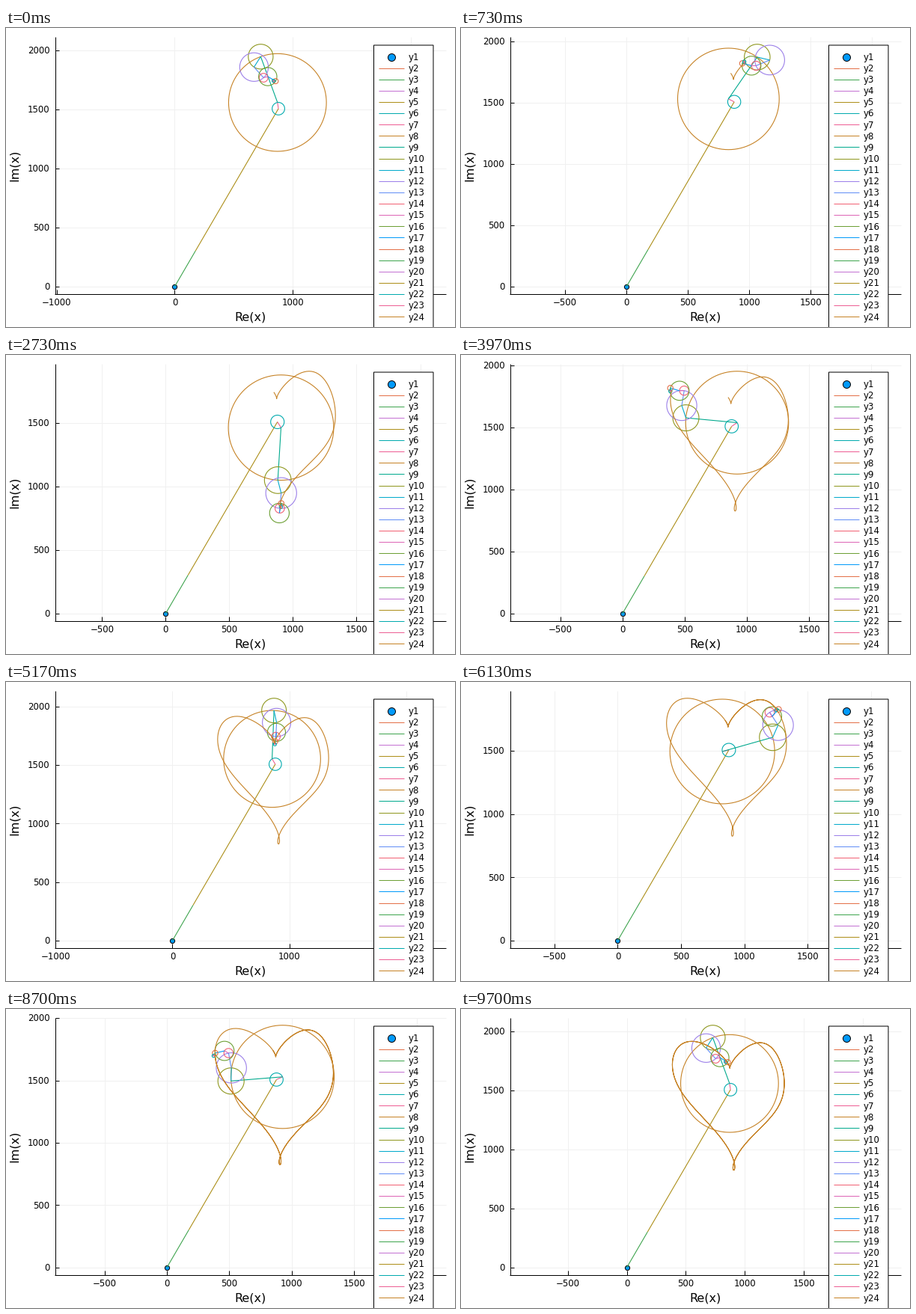
Write a matplotlib script that moves like this. It is 600 px wide and 400 px high and loops after 9730 ms.

```python
import numpy as np
import matplotlib.pyplot as plt
from matplotlib.animation import FuncAnimation
from matplotlib.collections import LineCollection
from matplotlib.patches import Rectangle

W, H, DPI = 600, 400, 100
PX = 72 / DPI                      # points per pixel
LOOP_MS, POSES = 9730, 292         # poses follow each other at 30 per second
LAP = POSES // 2                   # poses per lap, both ends included
FRAMES = 2 * POSES                 # half steps, to keep the 30/40 ms rhythm
INTERVAL = LOOP_MS / FRAMES

LEFT, RIGHT, TOP, BOTTOM = 65.6, 588, 12, 355.5
PAD = 0.03

PALETTE = ["#009afa", "#e36f47", "#3ea44e", "#c371d2", "#ac8e18", "#00aaae",
           "#ed5e93", "#c68225", "#00a98d", "#8e971e", "#00a9cc", "#9b7fe9",
           "#618df6", "#f06073", "#dd65b6", "#6c9f33"]

# Fourier terms: frequency, radius, starting angle in degrees
CENTRE = 878 + 1507j
TERMS = [(1, 53, 98.5), (-1, 414, 110.1), (2, 105, 237.5), (-2, 121, -48.2),
         (3, 37, 15), (-3, 77, -30), (4, 22, 172), (-4, 4, 350), (5, 13, -9)]
FREQ, RADIUS, ANGLE = np.array(TERMS, float).T
UNIT = np.exp(1j * np.linspace(0, 2 * np.pi, 101))

X_TICKS = range(-1000, 2001, 500)
Y_TICKS = range(0, 2001, 500)


def color(series):
    return PALETTE[(series - 1) % len(PALETTE)]


def joints(step):
    """Chain of arm ends, from the fixed centre to the tip."""
    turn = 2 * np.pi * (step % LAP) / (LAP - 1)
    arms = RADIUS * np.exp(1j * (np.radians(ANGLE) + FREQ * turn))
    return CENTRE + np.concatenate([[0], np.cumsum(arms)])


CHAINS = np.array([joints(k) for k in range(POSES)])
TIPS = CHAINS[:, -1]

plt.rcParams["font.family"] = "DejaVu Sans"
fig = plt.figure(figsize=(W / DPI, H / DPI), dpi=DPI, facecolor="white")
ax = fig.add_axes([0, 0, 1, 1])
ax.set_xlim(0, W)
ax.set_ylim(H, 0)
ax.axis("off")


def line(xs, ys, c="black", width=1.0, z=4):
    return ax.plot(xs, ys, color=c, lw=width * PX, zorder=z,
                   solid_capstyle="butt")[0]


def lines(segments, colors, width=1.0, z=2):
    group = LineCollection(segments, colors=colors, linewidths=width * PX,
                           zorder=z)
    return ax.add_collection(group, autolim=False)


def label(x, y, text, size=11.7, z=4, **kw):
    return ax.text(x, y, text, fontsize=size * PX, zorder=z, **kw)


def dot(x, y, size, z):
    return ax.plot([x], [y], "o", ms=size * PX, mfc=color(1), mec="black",
                   mew=PX, zorder=z)[0]


def tick_text(value):
    return str(value).replace("-", "\u2212")


def make_ticks(values, align):
    return [(v, line([], [], "#f0f0f0", z=0), line([], []),
             label(0, 0, tick_text(v), ha=align)) for v in values]


def draw_legend():
    ax.add_patch(Rectangle((491.5, 23), 79.5, 400, fc="white", ec="black",
                           lw=PX, zorder=6, snap=False))
    rows = [38.5 + 15.12 * i for i in range(24)]
    dot(515, rows[0], 10, 7)
    lines([[(497.5, y), (532, y)] for y in rows[1:]],
          [color(n) for n in range(2, 25)], z=7)
    for n, y in enumerate(rows, 1):
        label(538, y + 4.3, f"y{n}", z=7)


line([LEFT, LEFT], [TOP, BOTTOM + 0.5])
line([LEFT - 0.5, RIGHT], [BOTTOM, BOTTOM])
label((LEFT + RIGHT) / 2, 392, "Re(x)", 16, ha="center")
label(11, 183.5, "Im(x)", 16, rotation=90, ha="center", va="center")
draw_legend()

x_ticks = make_ticks(X_TICKS, "center")
y_ticks = make_ticks(Y_TICKS, "right")
origin = dot(0, 0, 6.2, 1)
arms = lines([], [color(3), color(5)]
             + [color(6 + i) for i in range(2 * len(TERMS))], 1.1)
trail = line([], [], color(24), 1.1, z=3)


def place_tick(parts, visible, grid, mark, text_pos):
    _, grid_line, mark_line, text = parts
    for artist in parts[1:]:
        artist.set_visible(visible)
    if visible:
        grid_line.set_data(*grid)
        mark_line.set_data(*mark)
        text.set_position(text_pos)


def pose_at(frame):
    """Latest pose due by the end of the frame, on a clock of 10 ms ticks."""
    ticks = int((frame + 1) * INTERVAL / 10)
    return min(int(0.3 * (ticks + 0.5)), POSES - 1)


def update(frame):
    k = pose_at(frame)
    chain, path = CHAINS[k], TIPS[:k + 1]
    tails = chain[:-1]

    # Height sets the scale; x is centred on the data at equal aspect.
    y_max = max((tails.imag + RADIUS).max(), path.imag.max())
    x_max = max((tails.real + RADIUS).max(), path.real.max())
    scale = (BOTTOM - TOP) / ((1 + 2 * PAD) * y_max)
    x0 = (LEFT + RIGHT) / 2 - scale * x_max / 2
    y0 = BOTTOM - scale * PAD * y_max

    def to_px(z):
        z = np.asarray(z)
        return np.column_stack([x0 + scale * z.real, y0 - scale * z.imag])

    segments = [to_px([0, 0.2 * CENTRE]), to_px([0.2 * CENTRE, CENTRE])]
    for tail, head, r in zip(tails, chain[1:], RADIUS):
        segments += [to_px(tail + r * UNIT), to_px([tail, head])]
    arms.set_segments(segments)
    trail.set_data(*to_px(path).T)
    origin.set_data([x0], [y0])

    coarse = x0 - 1000 * scale >= LEFT
    for parts in x_ticks:
        v = parts[0]
        x = x0 + scale * v
        shown = LEFT <= x <= RIGHT and not (coarse and v % 1000)
        place_tick(parts, shown, ([x, x], [TOP, BOTTOM]),
                   ([x, x], [BOTTOM - 5.5, BOTTOM]), (x, 371))
    for parts in y_ticks:
        y = y0 - scale * parts[0]
        place_tick(parts, y >= TOP, ([LEFT, RIGHT], [y, y]),
                   ([LEFT, LEFT + 5.5], [y, y]), (58.3, y + 4.3))
    return []


anim = FuncAnimation(fig, update, frames=FRAMES, interval=INTERVAL,
                     init_func=lambda: update(0), repeat=True, repeat_delay=0)
plt.show()
```
